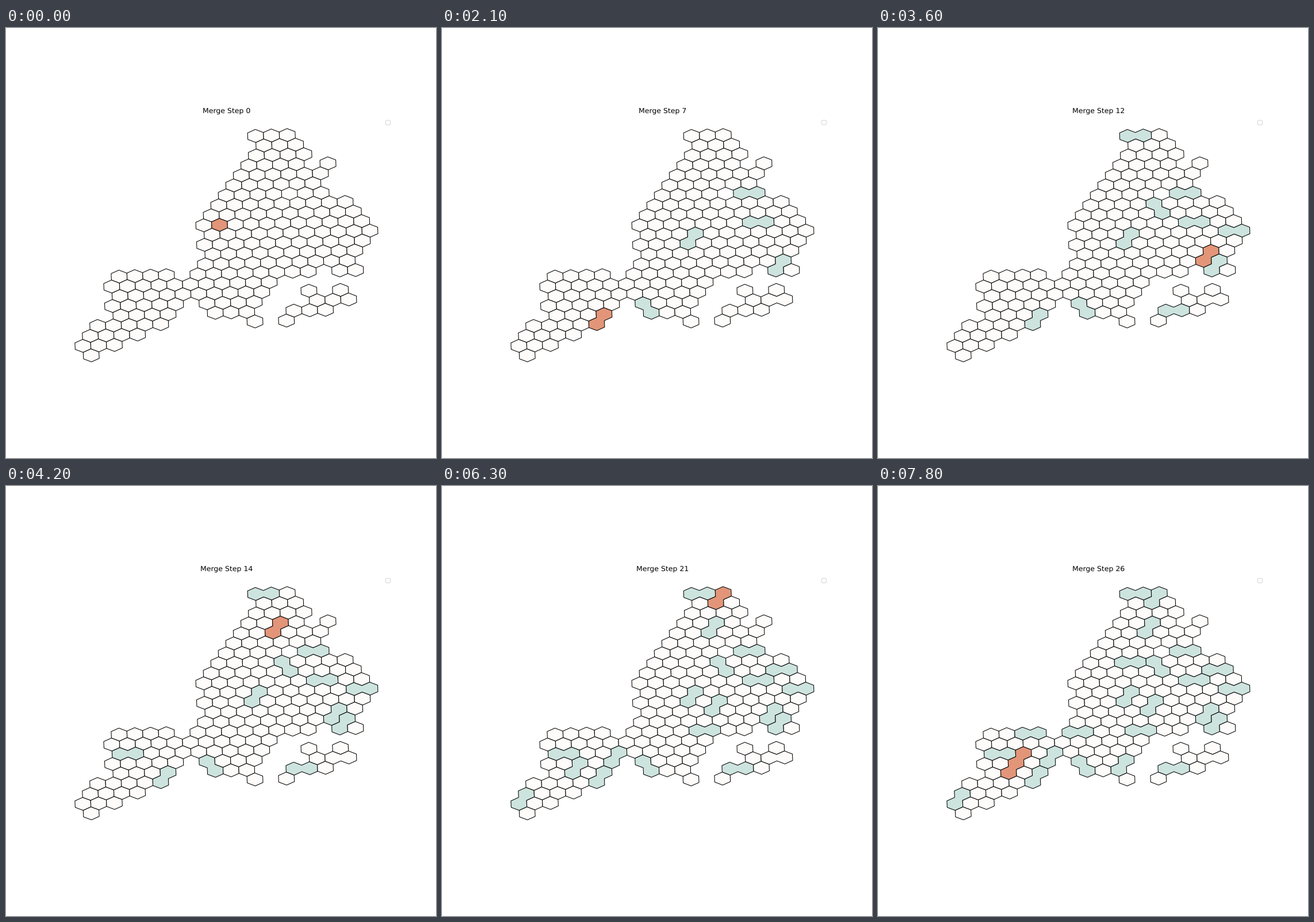
Animation of 748x748 px, one loop 8 s. Source, as a matplotlib script:

```python
import matplotlib.pyplot as plt
from matplotlib.animation import FuncAnimation
from matplotlib.collections import PolyCollection

SIZE = 748
PLAIN, MERGED, ACTIVE = "#fefcfb", "#cce3de", "#e29578"
LEFT, RIGHT, TOP, BOTTOM = 93.5, 673.2, 154.9, 601.0
CENTRE_X, CENTRE_Y = 383, 378

# Lattice directions as (row, column) steps.
E, SE, SW = (0, 1), (1, 1), (1, 0)
LAST_CELL = (9, 2)

# One merge per step: a cell and the neighbour it joins.
MERGES = [
    (17, 13, E), (10, 5, SW), (13, 12, SW), (6, 6, E), (9, 8, E),
    (17, 5, SE), (18, 3, SW), (7, 5, SE), (18, 11, E), (10, 11, E),
    (0, 0, E), (12, 11, SW), (16, -1, E), (3, 3, SW), (11, 7, SW),
    (17, 1, SW), (16, 3, SW), (14, 7, E), (20, -1, SW), (8, 9, E),
    (0, 2, SW), (14, 0, E), (14, 3, E), (7, 3, E), (17, 8, SW),
    (16, 1, SW),
]

# Hexagon corners in thirds of a lattice step.
CORNERS = [(1, 2), (2, 1), (1, -1), (-1, -2), (-2, -1), (-1, 1)]


def span(row, first, last):
    return {(row, k) for k in range(first, last + 1)}


def land():
    """Mainland, western arm and southern isle, less a few coves."""
    cells = {(3, 6), (14, 3), (14, 12), (14, 13), (16, 11), (16, 13),
             (19, 9), (19, 11)}
    for r in range(19):
        cells |= span(r, max(min(r, 1), r // 2 - 3),
                      min(r + 2, 12, max(8, 38 - 2 * r)))
    for r in range(14, 23):
        cells |= span(r, min(r // 2 - 9, r // 22 - 1),
                      min(2 * r - 27, 22 - r))
    for r in (17, 18):
        cells |= span(r, 29 - r, 31 - r)
    coves = {(3, 5), (5, 7), (6, 5), (6, 8), (17, 4), (18, 4), (18, -1)}
    return sorted(cells - coves)


def to_pixel(corner):
    """Lattice to screen, with the slight bend of a longitude-latitude map."""
    r, k = corner[0] / 3, corner[1] / 3
    east = 50.97 - 13.035 * r + 27.437 * k
    north = 189.97 - 17.339 * r + 0.767 * k
    x = east + 2.26e-5 * east * north
    y = north + 6.7e-6 * north ** 2 - 4.6e-6 * east ** 2
    return CENTRE_X + x, CENTRE_Y - y


def outline(group):
    """Boundary of a union of neighbouring cells."""
    edges = set()
    for r, k in group:
        ring = [(3 * r + dr, 3 * k + dk) for dr, dk in CORNERS]
        edges.update(zip(ring, ring[1:] + ring[:1]))
    following = {a: b for a, b in edges if (b, a) not in edges}
    start = corner = min(following)
    path = []
    while True:
        path.append(to_pixel(corner))
        corner = following[corner]
        if corner == start:
            return path


def groups_at(step):
    """Groups of joined cells and the one joined last."""
    group_of = {cell: frozenset([cell]) for cell in CELLS}
    active = group_of[LAST_CELL]
    for r, k, (dr, dk) in MERGES[:step]:
        active = group_of[r, k] | group_of[r + dr, k + dk]
        group_of.update(dict.fromkeys(active, active))
    return list(dict.fromkeys(group_of.values())), active


def colour(group, active):
    if group == active:
        return ACTIVE
    # The very first pair fades back to plain.
    joined = len(group) > 1 and MERGES[0][:2] not in group
    return MERGED if joined else PLAIN


CELLS = land()

plt.rcParams["text.hinting"] = "none"
fig = plt.figure(figsize=(10, 10), dpi=SIZE / 10, facecolor="white")
ax = fig.add_axes([LEFT / SIZE, 1 - BOTTOM / SIZE,
                   (RIGHT - LEFT) / SIZE, (BOTTOM - TOP) / SIZE])
ax.set_xlim(LEFT, RIGHT)
ax.set_ylim(BOTTOM, TOP)
ax.axis("off")
ax.legend([], [], loc="upper right")
title = ax.set_title("", fontsize=12, fontfamily="DejaVu Sans")
tiles = PolyCollection([], edgecolors="black", linewidths=1, joinstyle="miter")
ax.add_collection(tiles, autolim=False)


def update(frame):
    step = frame // 3
    groups, active = groups_at(step)
    tiles.set_verts([outline(g) for g in groups])
    tiles.set_facecolor([colour(g, active) for g in groups])
    title.set_text(f"Merge Step {step}")
    return tiles, title


animation = FuncAnimation(fig, update, frames=80, interval=100,
                          repeat=True, repeat_delay=0, blit=False)
plt.show()
```
